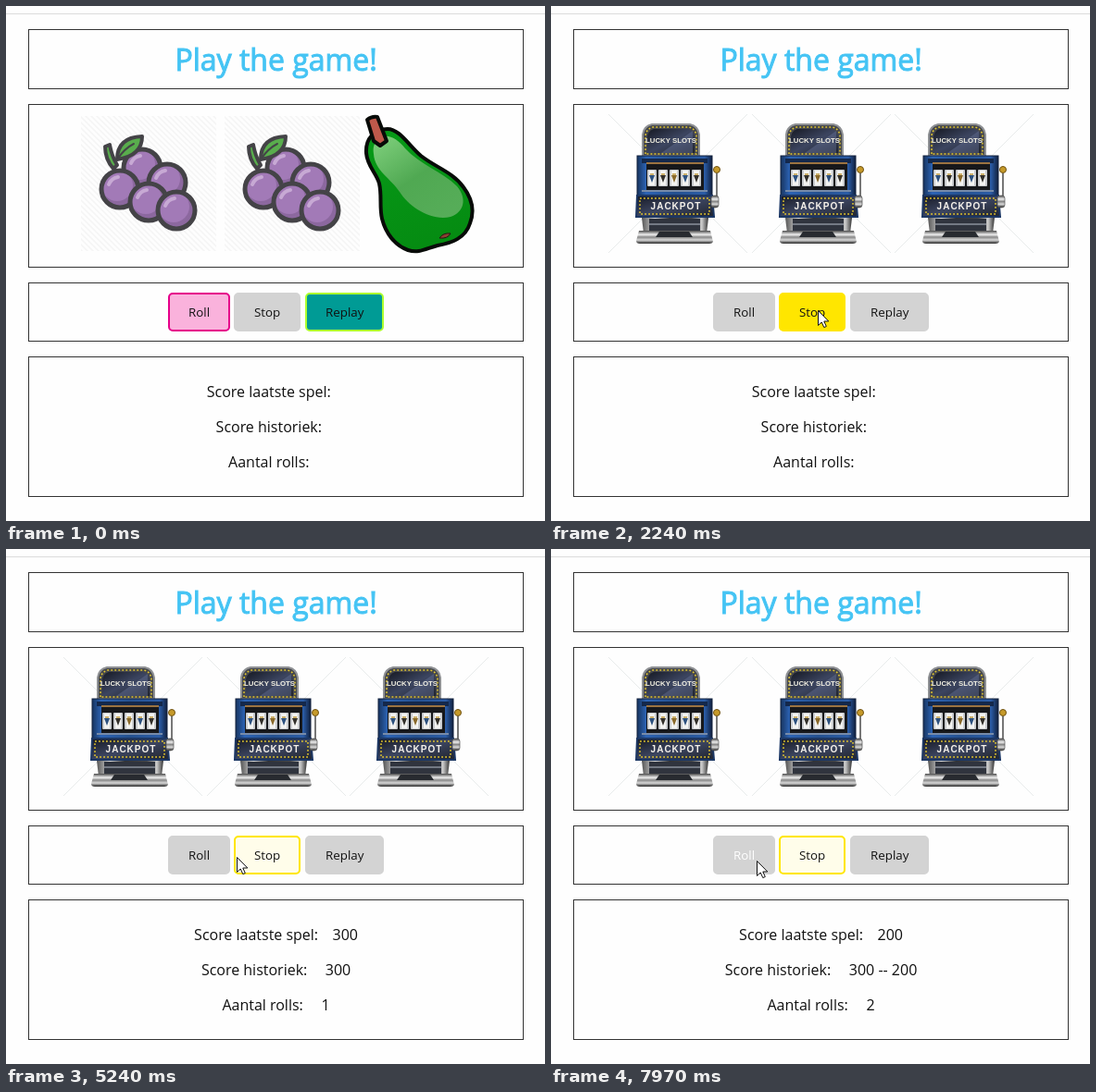
Write an HTML page that moves like this. It is 582 px wide and 557 px high and loops after 8000 ms.

```html
<!DOCTYPE html>
<html lang="nl">
<head>
<meta charset="utf-8">
<title>Play the game!</title>
<style>
html, body { margin: 0; width: 100%; height: 100%; overflow: hidden; background: #fefefe; }
svg { display: block; }
text { font-family: "Open Sans", sans-serif; white-space: pre; }
.title { font-size: 32px; fill: #45c4f4; stroke: #45c4f4; stroke-width: 1; }
.score { font-size: 16px; fill: #111; }
.btn text { font-size: 13.333px; }
.btn rect { stroke-width: 2; }
.frame { fill: none; stroke: #333; }
.ink { stroke: #444347; stroke-width: 5; stroke-linejoin: round; stroke-linecap: round; }
.sign { font: bold 7.8px "Liberation Sans", Arial, sans-serif; fill: #f4f2e4; }
.jackpot { font: bold 10px "Liberation Sans", Arial, sans-serif; letter-spacing: 1px; fill: #f5f1ea; }
.dots { fill: none; stroke: #e5c92e; stroke-width: 1.5; stroke-dasharray: 1.8 2.2; }
</style>
</head>
<body>
<svg id="stage" width="582" height="557" viewBox="0 0 582 557">
  <defs>
    <pattern id="hatch" width="6" height="6" patternUnits="userSpaceOnUse">
      <path d="M-1 -1L7 7M-1 5L1 7M5 -1L7 1" stroke="#f5f5f5" stroke-width="1.6"/>
    </pattern>
    <linearGradient id="gloss" x1="0" y1="0" x2=".75" y2="1">
      <stop offset="0" stop-color="#8fd88a"/><stop offset=".55" stop-color="#58ab59"/><stop offset="1" stop-color="#5fb060"/>
    </linearGradient>
    <linearGradient id="skin" x1="0" y1="0" x2=".3" y2="1">
      <stop offset="0" stop-color="#079a18"/><stop offset="1" stop-color="#058c12"/>
    </linearGradient>
    <linearGradient id="chrome" x2="0" y2="1">
      <stop offset="0" stop-color="#4a4a4a"/><stop offset=".3" stop-color="#f0f0f0"/><stop offset=".5" stop-color="#888"/>
      <stop offset=".72" stop-color="#d8d8d8"/><stop offset="1" stop-color="#222"/>
    </linearGradient>
    <linearGradient id="pillar">
      <stop offset="0" stop-color="#555"/><stop offset=".2" stop-color="#ddd"/><stop offset=".42" stop-color="#333"/>
      <stop offset=".75" stop-color="#4a4a4a"/><stop offset=".9" stop-color="#ccc"/><stop offset="1" stop-color="#333"/>
    </linearGradient>
    <linearGradient id="panel" x2="1" y2="1">
      <stop offset="0" stop-color="#171a24"/><stop offset=".5" stop-color="#3c4560"/><stop offset="1" stop-color="#20242e"/>
    </linearGradient>
    <linearGradient id="cabinet">
      <stop offset="0" stop-color="#17345f"/><stop offset=".12" stop-color="#2c63b4"/><stop offset=".5" stop-color="#24508f"/>
      <stop offset=".9" stop-color="#2b5ca6"/><stop offset="1" stop-color="#101f3c"/>
    </linearGradient>
    <clipPath id="orangeClip"><circle cx="76.500" cy="81" r="45"/></clipPath>
    <clipPath id="ballClip"><circle r="24"/></clipPath>

    <g id="grape">
      <circle r="20" fill="#8c689f"/>
      <circle cx="-3" cy="-4" r="17" fill="#a27ab7"/>
      <path d="M-12 -5Q-9 -12 -2 -13" fill="none" stroke="#c7a9d4" stroke-width="4" stroke-linecap="round"/>
      <circle r="20" fill="none" class="ink"/>
    </g>
    <g id="ball">
      <circle r="24" fill="#b23328"/>
      <circle cx="-4" cy="-4" r="23" fill="#d2412b" clip-path="url(#ballClip)"/>
      <path d="M-15 -6Q-7 -16 5 -12" fill="none" stroke="#efb040" stroke-width="5" stroke-linecap="round"/>
      <circle r="24" fill="none" class="ink"/>
    </g>

    <g id="grapes">
      <rect x="3" y="2" width="146" height="146" fill="url(#hatch)"/>
      <use href="#grape" x="69" y="58"/><use href="#grape" x="96" y="74"/>
      <use href="#grape" x="45" y="81"/><use href="#grape" x="76" y="95"/><use href="#grape" x="106" y="104"/>
      <g fill="#59ad4d" class="ink" style="stroke-width:4">
        <path d="M29 35L34 33Q36 45 42 55L38 59Q29 49 29 35Z"/>
        <path d="M42 49Q42 25 69 24Q69 45 42 49Z"/>
        <path d="M42 49Q50 37 60 32" fill="none" style="stroke-width:2"/>
      </g>
    </g>

    <g id="cherries">
      <rect x="3" y="2" width="146" height="146" fill="url(#hatch)"/>
      <g fill="none" stroke-linecap="round" stroke-linejoin="round">
        <path id="stems" d="M47 29Q58 26 70 33Q91 45 100 65M62 30Q82 45 67 73" stroke="#444347" stroke-width="11"/>
        <path d="M47 29Q58 26 70 33Q91 45 100 65M62 30Q82 45 67 73" stroke="#5db052" stroke-width="4"/>
      </g>
      <g fill="#59ad4d" class="ink" style="stroke-width:4">
        <path d="M21 58Q27 34 58 36Q51 60 21 58Z"/>
        <path d="M21 58L46 44" style="stroke-width:2"/>
      </g>
      <use href="#ball" x="60.500" y="97"/><use href="#ball" x="105" y="90"/>
    </g>

    <g id="orange">
      <rect x="3" y="2" width="146" height="146" fill="url(#hatch)"/>
      <circle cx="76.500" cy="81" r="45" fill="#a5752c"/>
      <circle cx="70" cy="70" r="48" fill="#d9802f" clip-path="url(#orangeClip)"/>
      <ellipse cx="56" cy="64" rx="7.500" ry="13" transform="rotate(33 56 64)" fill="#ebb440"/>
      <circle cx="76.500" cy="81" r="45" fill="none" class="ink"/>
      <g fill="#59ad4d" class="ink" style="stroke-width:4.500">
        <path d="M47 42Q54 25 74 24Q95 25 103 42Q75 51 47 42Z"/>
        <path d="M47 42Q74 30 103 42" fill="none" style="stroke-width:3"/>
        <path d="M29 68Q27 48 49 43Q50 64 29 68Z"/>
        <path d="M29 68L43 53" style="stroke-width:2.500"/>
        <path d="M40 26L45 24L51 40L46 42Z" fill="#4f9d48"/>
      </g>
    </g>

    <g id="pear">
      <path d="M2 42C1 26 11 16 25 16C38 16 48 34 61 45C76 57 96 63 107 79C116 91 119 105 114 118C109 134 95 139 79 142C67 145 59 151 47 147C33 142 23 129 19 113C16 100 19 88 16 75C13 64 3 56 2 42Z"
        fill="url(#skin)" stroke="#080b08" stroke-width="4"/>
      <path d="M13 29C21 19 34 24 44 37C59 54 84 62 100 78C111 91 108 106 93 111C72 116 48 100 38 84C29 70 11 61 10 43C9 37 10 33 13 29Z"
        fill="url(#gloss)" opacity=".9"/>
      <path d="M81 134Q85 128 93 129Q90 135 81 134Z" fill="#8b4033" stroke="#231612" stroke-width="1"/>
      <path d="M3 6Q8 2 14 3L24 29L17 34L10 29Z" fill="#be594b" stroke="#080b08" stroke-width="4" stroke-linejoin="round"/>
    </g>

    <g id="slot">
      <path d="M0 0L150 150M150 0L0 150" stroke="#e8ebeb"/>
      <path d="M37 45V22Q38 13 47 11H88Q97 13 98 22V45Z" fill="#45474c" stroke="#8f9194" stroke-width="2"/>
      <path d="M40 43V23Q41 16 48 14H87Q94 16 95 23V43Z" fill="url(#panel)" class="dots"/>
      <path d="M42 42V24Q43 18 49 16H86Q92 18 93 24V42Z" fill="url(#panel)"/>
      <path d="M57 42L91 18V42Z" fill="#6b78a0" opacity=".4"/>
      <text class="sign" x="67.500" y="31" text-anchor="middle">LUCKY SLOTS</text>
      <rect x="31" y="45" width="81" height="43" fill="url(#cabinet)" stroke="#12213d"/>
      <rect x="36" y="48" width="71" height="5" fill="#14284b"/>
      <rect x="41" y="52" width="62" height="31" fill="#17181b"/>
      <path d="M41 53H103" stroke="#9b7341" stroke-width="2"/>
      <g id="reels"></g>
      <path d="M36 83H107" stroke="#778ba9" stroke-width="2"/>
      <path d="M31 88H112L114 111H30Z" fill="url(#panel)" stroke="#1c3764" stroke-width="2"/>
      <path d="M34 91H109V108H34Z" class="dots"/>
      <text class="jackpot" x="73" y="103" text-anchor="middle">JACKPOT</text>
      <path d="M36 112H108L106 129H38Z" fill="url(#pillar)"/>
      <path d="M44 113H99V126H44Z" fill="#30343e"/>
      <path d="M44 119H99" stroke="#747984" stroke-width="2"/>
      <path d="M33 126H110L113 138Q112 140 109 140H34Q30 140 30 137Z" fill="url(#chrome)"/>
      <path d="M55 127H87L91 133H51Z" fill="#282b30"/>
      <path d="M117 64V92" stroke="#777" stroke-width="2"/>
      <circle cx="117" cy="60" r="3.500" fill="#c69a2a" stroke="#6f5213"/>
      <rect x="111" y="88" width="8" height="13" rx="3" fill="url(#chrome)" stroke="#555" stroke-width=".7"/>
    </g>
  </defs>

  <rect width="582" height="557" fill="#fefefe"/>
  <path d="M0 8.500H582" stroke="#dcdcdc"/>
  <rect class="frame" x="24.500" y="25.500" width="534" height="64"/>
  <rect class="frame" x="24.500" y="106.500" width="534" height="176"/>
  <rect class="frame" x="24.500" y="299.500" width="534" height="63"/>
  <rect class="frame" x="24.500" y="379.500" width="534" height="151"/>
  <text class="title" x="182.400" y="70">Play the game!</text>
  <g id="images"></g>
  <g id="buttons"></g>
  <g id="scores"></g>
  <path id="cursor" d="M.5 .5V16.500L4.200 13L6.800 18.600L9.300 17.500L6.800 12H11.800Z" fill="#fff" stroke="#111"/>
</svg>
<script>
const LOOP = 8000;
const NS = 'http://www.w3.org/2000/svg';
const $ = id => document.getElementById(id);

function add(parent, tag, attrs, text = '') {
  const el = document.createElementNS(NS, tag);
  for (const k in attrs) el.setAttribute(k, attrs[k]);
  el.textContent = text;
  parent.append(el);
  return el;
}

for (let i = 0; i < 5; i++) {
  const x = 42 + i * 12;
  add($('reels'), 'rect', { x, y: 60, width: 10, height: 18, rx: 1, fill: '#c9cbce' });
  add($('reels'), 'rect', { x: x + 2, y: 61, width: 6, height: 16, fill: '#f4f4f2' });
  add($('reels'), 'path', { d: `M${x + 2} 66h6l-3 8z`, fill: ['#2d517f', '#33302b', '#8a6a2b'][i % 3] });
  add($('reels'), 'path', { d: `M${x + 3} 65h4`, stroke: '#c09a3c', 'stroke-width': 1.5 });
}

// Time at which each round state begins: reels, scores and their left edges
const spin = ['slot', 'slot', 'slot'];
const noScore = [[216.8], [226.6], [240.1]];
const oneGame = [[203.1, 352.5, '300'], [210.9, 344.8, '300'], [233.4, 340.4, '1']];
const twoGames = [[203.1, 352.5, '200'], [187.8, 321.8, '300 -- 200'], [233.4, 340.4, '2']];
const rounds = [
  [0, ['grapes', 'grapes', 'pear'], noScore],
  [1470, spin, noScore],
  [2770, ['orange', 'orange', 'orange'], oneGame],
  [4820, spin, oneGame],
  [5650, ['pear', 'cherries', 'cherries'], twoGames],
  [7880, spin, twoGames]
];

// Cursor moves: start, end, from x, y, to x, y
const moves = [
  [90, 890, 507, 550, 242, 362],
  [900, 1190, 242, 362, 210, 338],
  [1840, 2330, 210, 338, 295, 328],
  [3820, 4380, 295, 328, 204, 336],
  [4912, 5490, 204, 336, 279, 331],
  [7310, 7840, 279, 331, 222, 337]
];

const labels = ['Score laatste spel:', 'Score historiek:', 'Aantal rolls:'];
const layers = rounds.map(([, images, scores]) => {
  const pics = add($('images'), 'g', {});
  const widths = images.map(n => n === 'pear' ? 118 : 150);
  let x = 291.5 - (widths[0] + widths[1] + widths[2] + 8.4) / 2;
  images.forEach((name, i) => {
    add(pics, 'use', { href: '#' + name, transform: `translate(${Math.round(x)} 117)` });
    x += widths[i] + 4.2;
  });
  const rows = add($('scores'), 'g', { class: 'score' });
  scores.forEach(([left, valueX, value], i) => {
    const y = 423 + i * 38;
    add(rows, 'text', { x: left, y }, labels[i]);
    if (value) add(rows, 'text', { x: valueX, y }, value);
  });
  return [pics, rows];
});

function button(label, x, width) {
  const g = add($('buttons'), 'g', { class: 'btn' });
  const box = add(g, 'rect', { x: x + 1, y: 311, width: width - 2, height: 40, rx: 4 });
  const text = add(g, 'text', { x: x + 22, y: 336 }, label);
  return (fill, edge, ink = '#111') => {
    box.setAttribute('fill', fill);
    box.setAttribute('stroke', edge);
    text.setAttribute('fill', ink);
  };
}
const roll = button('Roll', 175, 67);
const stop = button('Stop', 246, 72);
const replay = button('Replay', 323, 85);
const GREY = '#d3d3d3';

function cursorAt(t) {
  const m = moves.filter(v => v[0] <= t).pop();
  if (!m) return [507, 570];
  const p = Math.min(1, (t - m[0]) / (m[1] - m[0]));
  const k = m === moves[0] ? 1 - (1 - p) ** 1.5 : p * p * (3 - 2 * p);
  return [m[2] + (m[4] - m[2]) * k, m[3] + (m[5] - m[3]) * k].map(Math.round);
}

function draw(t) {
  const now = rounds.filter(r => r[0] <= t).length - 1;
  layers.forEach((pair, i) => pair.forEach(el => el.setAttribute('display', i === now ? 'inline' : 'none')));

  const [x, y] = cursorAt(t);
  $('cursor').setAttribute('transform', `translate(${x} ${y})`);
  const onRow = y > 310 && y < 352;
  const onRoll = onRow && x > 175 && x < 242;
  const onStop = onRow && x > 249 && x < 318;

  if (now % 2) {
    roll(GREY, GREY, onRoll ? '#fff' : '#111');
    stop(onStop ? '#ffe600' : '#fffdea', '#ffe600');
    replay(GREY, GREY);
  } else {
    roll(onRoll ? '#ec008c' : '#fab2dc', '#e6008a', onRoll ? '#fff' : '#111');
    stop(GREY, GREY);
    replay('#009b95', '#adff2f');
  }
}

function tick(now) {
  draw(now % LOOP);
  requestAnimationFrame(tick);
}
draw(0);
requestAnimationFrame(tick);
</script>
</body>
</html>
```
